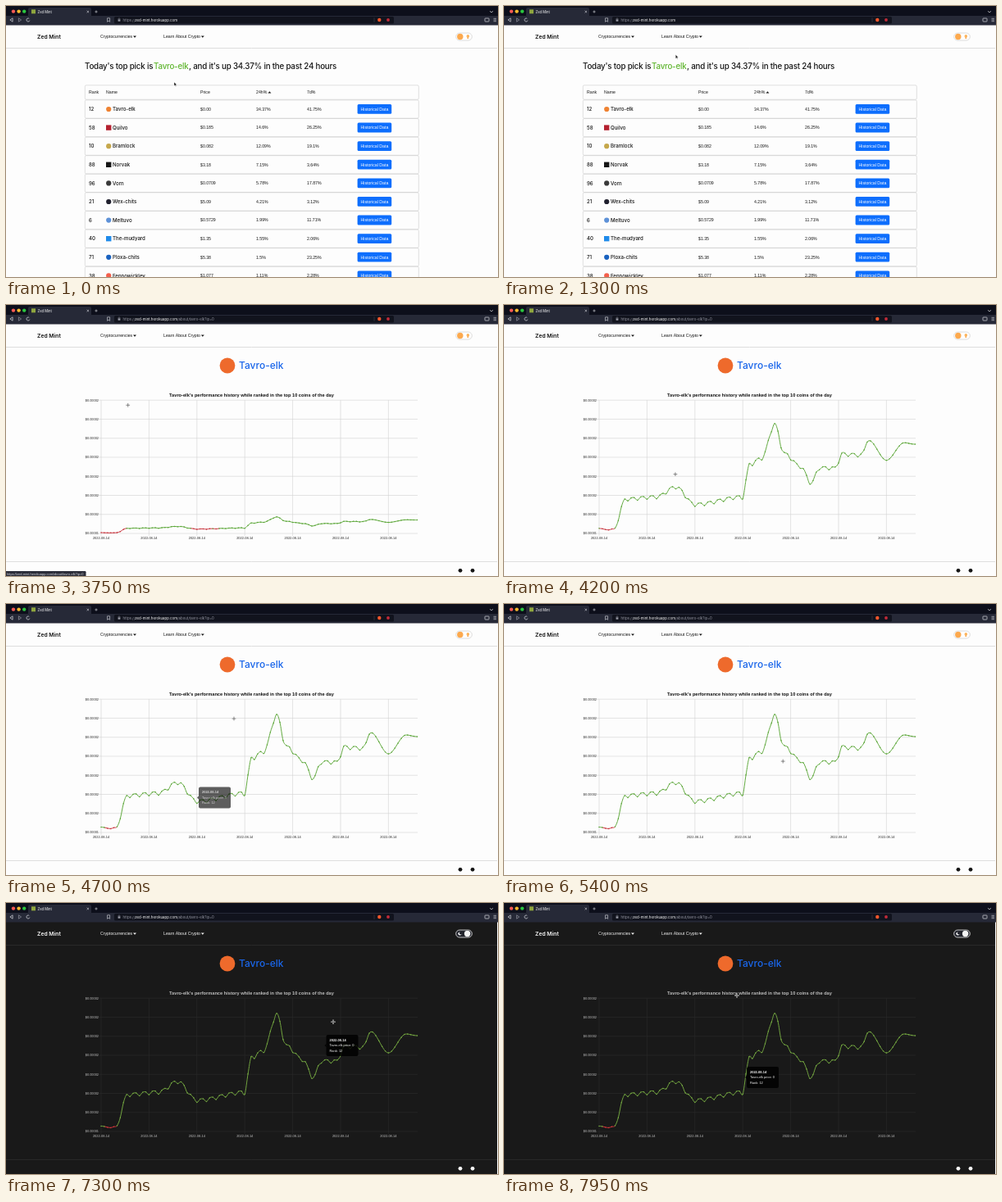
Recreate the animation shown at these times as an HTML page with a canvas. Size 600 px wide and 331 px high, loop 8000 ms.

```html
<!DOCTYPE html>
<html lang="en">
<head>
<meta charset="utf-8">
<title>Zed Mint</title>
<style>
html, body { margin: 0; width: 100%; height: 100%; overflow: hidden; background: #fdfdfd; }
canvas { display: block; width: 600px; height: 331px; }
</style>
</head>
<body>
<canvas id="stage"></canvas>
<script>
const W = 600, H = 331, LOOP = 8000;
const PAGE_AT = 3650, CHART_AT = 3714, DARK_AT = 6500;
const SANS = 'Inter, "Open Sans", sans-serif';
const ARIAL = '"Liberation Sans", Arial, sans-serif';
const HOST = 'zed-mint.herokuapp.com', PATH = '/about/tavro-elk?ip=0';
const BLUE = '#0d6efd', GREEN = '#5eb52d';
const LIGHT = { bg: '#fdfdfd', ink: '#151515', rule: '#d2d2d2', grid: '#d2d2d2', label: '#222', title: '#111', up: '#5aa636', down: '#c8323c' };
const DARK = { bg: '#191919', ink: '#f4f4f4', rule: '#303030', grid: '#2d2d2d', label: '#c4c4c4', title: '#bdbdbd', up: '#76ab42', down: '#d2353c' };

const canvas = document.getElementById('stage');
const ctx = canvas.getContext('2d');
const dpr = window.devicePixelRatio || 1;
canvas.width = W * dpr;
canvas.height = H * dpr;

const clamp = (v, a = 0, b = 1) => Math.min(b, Math.max(a, v));

// Keys are [position, ...values]; values ease between neighbours.
function track(keys, at) {
  const i = keys.findIndex(k => at <= k[0]);
  if (i === 0) return keys[0].slice(1);
  if (i < 0) return keys[keys.length - 1].slice(1);
  const [from, ...a] = keys[i - 1], [to, ...b] = keys[i];
  const u = (at - from) / (to - from), e = u * u * (3 - 2 * u);
  return a.map((v, k) => v + (b[k] - v) * e);
}

// Draws vertically centred text and returns its right edge.
function text(s, x, y, size, color, { weight = 400, font = ARIAL, align = 'left', spacing = 0 } = {}) {
  ctx.font = `${weight} ${size}px ${font}`;
  ctx.letterSpacing = spacing + 'px';
  ctx.textAlign = align;
  ctx.fillStyle = color;
  ctx.fillText(s, x, y + size * 0.36);
  return x + ctx.measureText(s).width;
}

function rect(x, y, w, h, color) {
  ctx.fillStyle = color;
  ctx.fillRect(x, y, w, h);
}

function paint(fill, stroke, lw) {
  if (fill) { ctx.fillStyle = fill; ctx.fill(); }
  if (stroke) { ctx.strokeStyle = stroke; ctx.lineWidth = lw; ctx.stroke(); }
}

function box(x, y, w, h, r, fill, stroke, lw = 0.6) {
  ctx.beginPath();
  ctx.roundRect(x, y, w, h, r);
  paint(fill, stroke, lw);
}

function disc(x, y, r, color) {
  ctx.beginPath();
  ctx.arc(x, y, r, 0, Math.PI * 2);
  paint(color);
}

function poly(points, fill, stroke, lw = 0.7, closed = true) {
  ctx.beginPath();
  points.forEach(([x, y]) => ctx.lineTo(x, y));
  if (closed) ctx.closePath();
  paint(fill, stroke, lw);
}

const line = (x1, y1, x2, y2, color, lw = 0.6) => poly([[x1, y1], [x2, y2]], null, color, lw, false);
const caret = (x, y, color) => poly([[x, y - 1], [x + 4, y - 1], [x + 2, y + 1.3]], color);

function drawBrowser(onAbout) {
  const icon = '#dcdde2', dim = '#9799a4', bar = '#262937', mid = 17;
  rect(0, 0, W, 23.5, bar);
  rect(0, 0, W, 12, '#0d0f1b');
  box(27, 2, 77, 12, 2, bar);
  ['#fb5a54', '#fbbb2e', '#2ac63f'].forEach((color, i) => disc(9 + 6.6 * i, 6.6, 2.2, color));
  rect(31, 4.3, 5, 5, '#8fa53e');
  text('Zed Mint', 38.5, 7, 4.2, '#fff', { font: SANS });
  for (const s of [-1, 1]) line(98.6, 7 - 1.2 * s, 101, 7 + 1.2 * s, icon);
  line(108.4, 7, 111.6, 7, icon);
  line(110, 5.4, 110, 8.6, icon);
  poly([[590, 6.2], [592, 8], [594, 6.2]], null, icon, 0.7, false);

  for (const [x, s, color] of [[6.5, -1, icon], [17, 1, dim]])
    poly([[x - 1.6 * s, mid - 2.2], [x + 1.6 * s, mid], [x - 1.6 * s, mid + 2.2]], null, color);
  ctx.beginPath();
  ctx.arc(27, mid, 2, 0.3, 5.4);
  paint(null, icon, 0.7);
  poly([[123.6, 14.8], [126.6, 14.8], [126.6, 19.3], [125.1, 18], [123.6, 19.3]], null, icon, 0.6);

  box(132, 13, 341, 8.4, 1.5, '#11131d');
  box(136.6, 16.4, 2.8, 2.3, 0.3, dim);
  box(137.1, 14.8, 1.8, 2.5, 0.9, null, dim, 0.5);
  const schemeEnd = text('https://', 142.5, mid, 4.35, dim, { font: SANS });
  const hostEnd = text(HOST, schemeEnd, mid, 4.35, '#fff', { font: SANS });
  if (onAbout) text(PATH, hostEnd, mid, 4.35, dim, { font: SANS });
  line(449, 14.3, 449, 19.8, '#4a4c58', 0.5);
  disc(455.3, mid, 2.2, '#f1562b');
  disc(466, mid, 1.9, '#c22a3a');
  box(584, 15, 5, 4, 0.6, null, icon, 0.7);
  for (let i = -1; i <= 1; i++) line(594.5, mid + 1.7 * i, 598, mid + 1.7 * i, icon);
}

function drawToggle(t, c, dark) {
  if (t > 6050 && t < 6800)
    text(dark ? 'Dark Mode' : 'Light Mode', 543.5, 37.5, 5.2, c.ink, { align: 'right' });
  const slot = dark ? '#22242c' : '#fff';
  box(548.7, 33, 19.6, 9, 4.5, slot, dark ? '#f0f0f0' : '#d4d4d4', 0.8);
  if (dark) {
    disc(553.5, 37.5, 2.1, '#fff');
    disc(554.6, 36.8, 1.8, slot);
  } else {
    disc(563.3, 36.9, 1.8, '#fcb45c');
    rect(562.6, 38.2, 1.4, 1.9, '#f3a24c');
  }
  disc(553.8 + 8.8 * clamp((t - DARK_AT) / 200), 37.5, 3.7, dark ? '#f4f4f4' : '#fca94e');
}

function drawNav(t, c, menuOpen) {
  text('Zed Mint', 38, 37.5, 6.75, c.ink, { weight: 600, font: SANS });
  const learn = menuOpen ? GREEN : c.ink;
  for (const [label, x, color] of [['Cryptocurrencies', 115, c.ink], ['Learn About Crypto', 192, learn]])
    caret(text(label, x, 37.3, 5.2, color) + 0.8, 37.4, color);
  line(0, 51.5, W - 1, 51.5, c.rule, 0.7);
  drawToggle(t, c, t >= DARK_AT);
}

// rank, name, price, day, week, mark colour, square mark
const COINS = [
  [12, 'Tavro-elk', '$0.00', '34.37%', '41.75%', '#ef8232'],
  [58, 'Quilvo', '$0.185', '14.6%', '26.25%', '#b4202f', true],
  [10, 'Bramlock', '$0.082', '12.09%', '19.1%', '#c6a84c'],
  [88, 'Norvak', '$3.18', '7.15%', '3.64%', '#161616', true],
  [96, 'Vorn', '$0.0709', '5.78%', '17.87%', '#3a3a3a'],
  [21, 'Wex-chits', '$5.09', '4.21%', '3.12%', '#20202e'],
  [6, 'Meltuvo', '$0.5729', '1.99%', '11.71%', '#5f92d8'],
  [40, 'The-mudyard', '$1.35', '1.55%', '2.06%', '#1f8bea', true],
  [71, 'Ploxa-chits', '$5.38', '1.5%', '23.25%', '#1a62c0'],
  [38, 'Fennowickley', '$1.077', '1.11%', '2.28%', '#f4604c']
];

function drawHome(c) {
  const head = { weight: 500, font: SANS, spacing: -0.2 };
  text("Today's top pick is", 96, 73, 9.75, c.ink, head);
  text('Tavro-elk', 180, 73, 9.75, GREEN, head);
  text(", and it's up 34.37% in the past 24 hours", 223, 73, 9.75, c.ink, head);

  const columns = [237, 305, 367], medium = { weight: 500, font: SANS };
  box(96.3, 96.8, 407, 17.4, 1.5, null, '#cbcbcb');
  text('Rank', 101, 105.5, 5.2, c.ink);
  text('Name', 122, 105.5, 5.2, c.ink);
  ['Price', '24h%', '7d%'].forEach((s, k) => text(s, columns[k], 105.5, 5.2, c.ink));
  poly([[319.4, 106.6], [323.4, 106.6], [321.4, 104.2]], c.ink);

  COINS.forEach(([rank, name, price, day, week, color, square], i) => {
    const y = 126 + 22.6 * i;
    box(96.3, y - 11.1, 407, 22.2, 1.5, null, '#cbcbcb');
    text(rank, 101, y, 6.1, c.ink, medium);
    if (square) rect(122, y - 3.2, 6.4, 6.4, color);
    else disc(125.2, y, 3.1, color);
    text(name, 130, y, 6.1, c.ink, medium);
    [price, day, week].forEach((s, k) => text(s, columns[k], y, 5.2, c.ink));
    box(428.6, y - 6, 41.6, 11.8, 1.5, BLUE);
    text('Historical Data', 449.4, y, 5.2, '#fff', { align: 'center' });
  });
}

function drawMenu(c) {
  box(192.2, 41, 63.6, 71, 0.5, '#fff', '#c9c9c9');
  ['Guides', 'News', 'What are NFTs', 'What is Cryptocurrency?']
    .forEach((s, i) => text(s, 197, 50 + 12 * i, 4.6, c.ink));
  text('(video)', 197, 91.3, 4.6, c.ink);
  text('Airdrops', 197, 103, 4.6, c.ink);
}

const X0 = 116, BASE = 279, STEP = 58.4 / 15, COUNT = 100, LOW = 273.15;

// Turning points of the price curve: [sample, height on stage].
const TURNS = [
  [0, 272.4], [3, 274.4], [5, 272], [8, 234], [18, 231], [24, 218], [30, 241], [45, 231],
  [47, 189], [51, 180], [55, 136], [58, 174], [63, 191], [66.5, 213], [69, 193],
  [74, 193], [76, 175], [82, 176], [84.5, 157], [90, 183], [95.5, 160], [99, 162]
];

function level(i) {
  const ripple = i > 8 && i < 83 ? 2.5 * Math.cos(i * Math.PI * 2 / 3) : 0;
  return track(TURNS, i)[0] + ripple;
}

function curvePoints(t) {
  const rise = 1 - Math.pow(1 - clamp((t - CHART_AT) / 1000), 4);
  return Array.from({ length: COUNT }, (_, i) => [X0 + STEP * i, BASE - (BASE - level(i)) * rise]);
}

function drawCurve(t, c) {
  const pts = curvePoints(t), last = COUNT - 1;
  const slope = i => {
    const a = pts[Math.max(0, i - 1)], b = pts[Math.min(last, i + 1)];
    return [(b[0] - a[0]) * 0.17, (b[1] - a[1]) * 0.17];
  };
  for (let i = 0; i < last; i++) {
    const p = pts[i], q = pts[i + 1], m = slope(i), n = slope(i + 1);
    ctx.beginPath();
    ctx.moveTo(p[0], p[1]);
    ctx.bezierCurveTo(p[0] + m[0], p[1] + m[1], q[0] - n[0], q[1] - n[1], q[0], q[1]);
    paint(null, Math.max(p[1], q[1]) > LOW ? c.down : c.up, 0.95);
  }
  pts.forEach(([x, y]) => disc(x, y, 0.75, y > LOW ? c.down : c.up));
}

function drawAbout(t, c) {
  disc(270, 74, 9.4, '#ee6a2c');
  text('Tavro-elk', 284, 74, 12, '#1a66ea', { weight: 500, font: SANS });
  text("Tavro-elk's performance history while ranked in the top 10 coins of the day",
    299.5, 109.6, 5.66, c.title, { weight: 700, align: 'center' });

  for (let i = 0; i < 8; i++) {
    const y = 116.2 + 23.26 * i;
    line(113, y, 502, y, c.grid);
    text(i < 7 ? '$0.00002' : '$0.00001', 113, y, 3.9, c.label, { align: 'right' });
  }
  for (let i = 0; i < 7; i++) {
    const x = X0 + 58.4 * i;
    line(x, 116.2, x, 282, c.grid);
    text('2022-08-14', x, 285, 3.95, c.label, { align: 'center' });
  }
  drawCurve(t, c);

  line(0, 313.5, W - 1, 313.5, c.rule, 0.7);
  for (const x of [554, 569]) disc(x, 324.3, 2.4, c.ink);
}

// Each tooltip: [shown, gone, x, y]
const TIPS = [[4430, 4885, 235, 223.5], [7100, 7650, 390.5, 161], [7780, 8300, 296, 200]];

function drawTip(t) {
  const tip = TIPS.find(([from, to]) => t > from && t < to);
  if (!tip) return;
  const [from, to, x, y] = tip, bg = 'rgba(0,0,0,.85)';
  ctx.globalAlpha = clamp((t - from) / 80) * clamp((to - t) / 250);
  box(x, y, 39, 26, 2, bg);
  poly([[x, y + 11], [x - 2, y + 13], [x, y + 15]], bg);
  ['2022-08-14', 'Tavro-elk price: 0', 'Rank: 12'].forEach((s, i) =>
    text(s, x + 4, y + 6.3 + 6.4 * i, 3.95, '#fff', { weight: i ? 400 : 700 }));
  ctx.globalAlpha = 1;
}

const CURSOR = [
  [0, 205, 93], [900, 205, 93], [1600, 212, 38], [2500, 191.5, 64], [3300, 147, 125],
  [3730, 148.5, 122], [4450, 232, 239], [4700, 278, 140], [5150, 289, 228], [6050, 558.5, 39],
  [6600, 558.5, 39], [7300, 399, 145.3], [7800, 287, 229], [7950, 284, 113]
];

function drawCursor(t) {
  const [x, y] = track(CURSOR, t);
  if ((t > 3250 && t < PAGE_AT) || (t > 6050 && t < 6700)) {
    box(x - 1.6, y + 2.2, 4.2, 3.4, 1.2, '#fff', '#222');
    box(x - 0.6, y, 1.2, 3.6, 0.6, '#fff', '#222', 0.4);
  } else if (t >= PAGE_AT && y > 105) {
    for (const [color, lw, r] of [['rgba(255,255,255,.75)', 1.4, 2.7], ['#555', 0.7, 2.4]]) {
      line(x - r, y, x + r, y, color, lw);
      line(x, y - r, x, y + r, color, lw);
    }
  } else {
    poly([[x, y], [x, y + 4.6], [x + 1.1, y + 3.6], [x + 1.9, y + 5.2], [x + 2.6, y + 4.8],
      [x + 1.9, y + 3.3], [x + 3.3, y + 3.2]], '#111', '#fff', 0.4);
  }
}

function drawStatus() {
  box(-2, 325, 99.5, 8, 1.2, '#2b2d39');
  text('https://' + HOST + PATH, 1, 328.2, 4, '#d8d9df');
}

function draw(t) {
  const c = t >= DARK_AT ? DARK : LIGHT;
  const onAbout = t >= PAGE_AT;
  const menuOpen = t >= 1500 && t < 2600;
  ctx.setTransform(dpr, 0, 0, dpr, 0, 0);
  rect(0, 0, W, H, LIGHT.bg);
  rect(0, 0, W - 1, H, c.bg);
  drawBrowser(onAbout);
  if (onAbout) drawAbout(t, c);
  else drawHome(c);
  drawNav(t, c, menuOpen);
  if (menuOpen) drawMenu(c);
  drawTip(t);
  if (t >= 3450 && t < 4050) drawStatus();
  drawCursor(t);
}

function frame() {
  draw(performance.now() % LOOP);
  requestAnimationFrame(frame);
}
frame();
</script>
</body>
</html>
```
